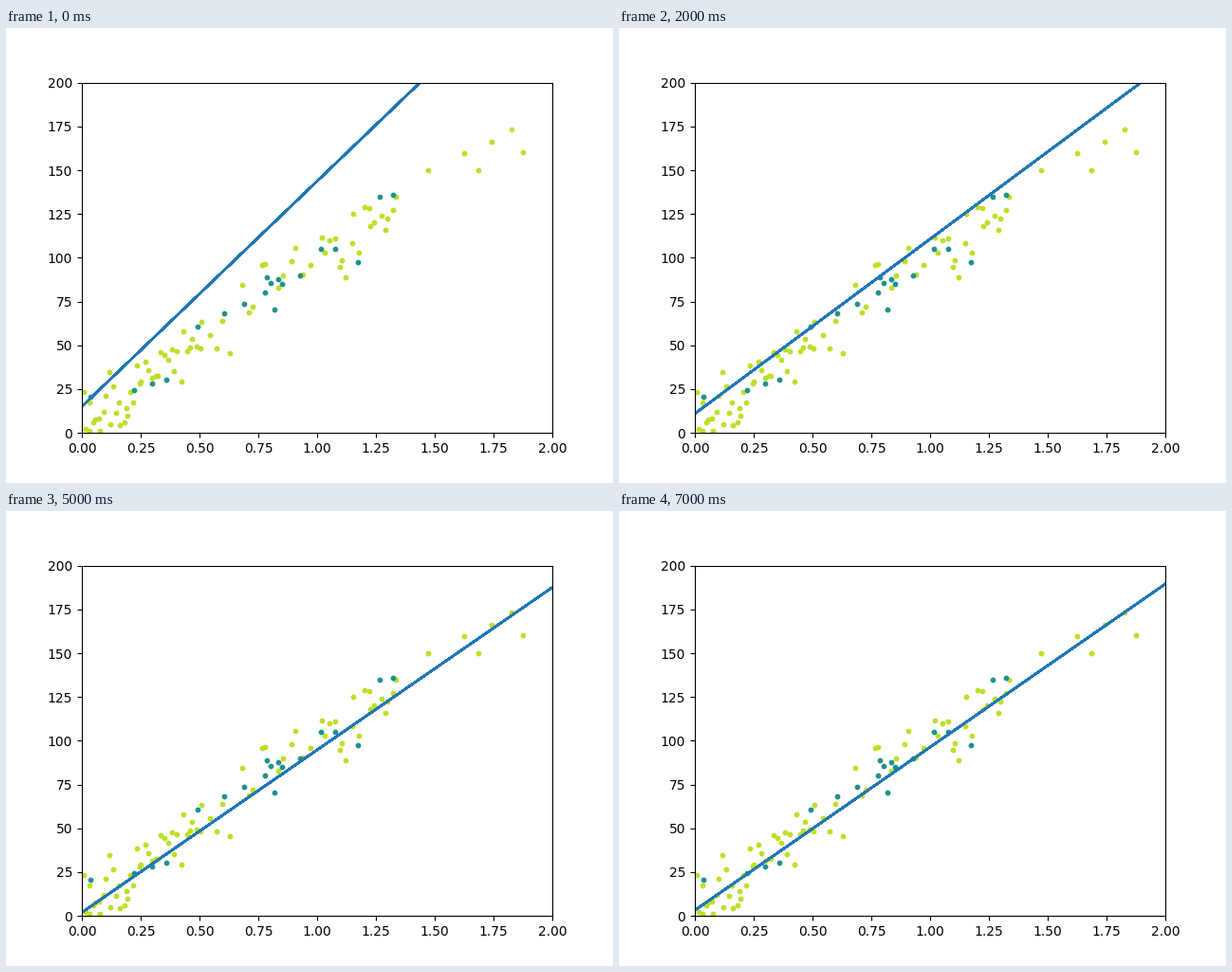
Recreate the animation shown at these times as a matplotlib script. Size 640x480 px, loop 8000 ms.

```python
import numpy as np
import matplotlib.pyplot as plt
from matplotlib.animation import FuncAnimation

STEPS = 8
STEP_MS = 1000

# Gradient descent on (intercept, slope): two orthogonal error modes
BEST = np.array([4.0, 93.4])
MODES = [
    (21.4, -0.62, np.array([1, 0.38])),
    (27.1, 0.34, np.array([-0.38, 1])),
]

rng = np.random.default_rng(4)


def fit(step):
    return BEST + sum(size * rate ** step * axis for size, rate, axis in MODES)


def noisy_cloud(count, shares, quantiles, spread):
    """Points around the best line, with x spread along a quantile curve."""
    rank = (np.arange(count) + rng.uniform(0, 1, count)) / count
    x = np.interp(rank, shares, quantiles)
    noise = np.clip(rng.normal(0, spread, count), -2 * spread, 2 * spread)
    y = np.abs(BEST[0] + BEST[1] * x + noise)
    return x, y


fig, ax = plt.subplots(figsize=(6.4, 4.8), dpi=100)
viridis = plt.get_cmap("viridis")


def scatter(x, y, shade):
    ax.scatter(x, y, s=10, color=viridis(shade))


# Training points: dense near zero, another cluster past one, a sparse tail
scatter(*noisy_cloud(77, [0, 0.27, 0.55, 0.77, 1],
                     [0, 0.22, 0.51, 1.03, 1.35], 10), 0.9)
scatter([1.47, 1.627, 1.685, 1.743, 1.828, 1.876],
        [150, 160, 150, 166, 173.5, 160.5], 0.9)

# Test points, bunched around 0.8
scatter(*noisy_cloud(19, [0, 0.35, 0.39, 0.68, 1],
                     [0.03, 0.69, 0.77, 0.86, 1.35], 8), 0.5)

# Unsorted samples make the stroke retrace itself, which hardens its edges
xs = rng.uniform(-2, 2.6, 60)
line, = ax.plot(xs, xs, color="tab:blue")
ax.set_xlim(0, 2)
ax.set_ylim(0, 200)


def draw(step):
    intercept, slope = fit(step)
    line.set_ydata(intercept + slope * xs)
    return line,


anim = FuncAnimation(fig, draw, frames=STEPS, interval=STEP_MS,
                     repeat=True, repeat_delay=0)
plt.show()
```
